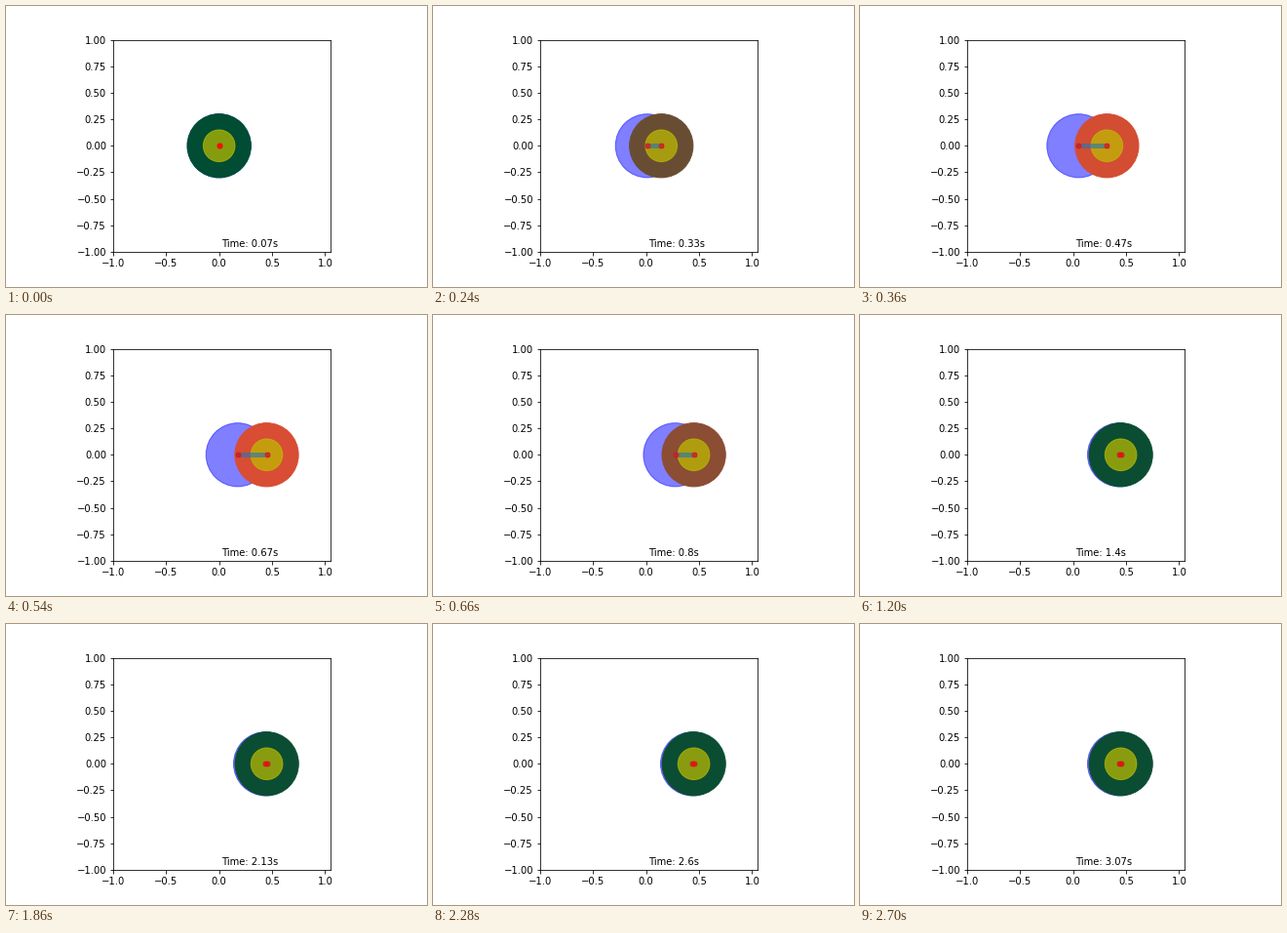
Animation of 432x288 px, one loop 2760 ms. Source, as a matplotlib script:

```python
import matplotlib.pyplot as plt
from matplotlib.animation import FuncAnimation
from matplotlib.patches import Circle

FRAMES = 46
INTERVAL = 60
FPS = 15

plt.rcParams["font.family"] = "DejaVu Sans"


def smooth_reach(t, start, duration, distance):
    """Minimum-jerk move from 0 to distance."""
    u = min(max((t - start) / duration, 0.0), 1.0)
    return distance * u**3 * (10 - 15 * u + 6 * u * u)


def lead_x(t):
    return smooth_reach(t, 0.085, 0.62, 0.45)


def follower_x(t):
    return smooth_reach(t, 0.176, 1.095, 0.436)


fig = plt.figure(figsize=(6, 4), dpi=72, facecolor="white")
fig.subplots_adjust(left=0.125, right=0.9, bottom=0.125, top=0.88)
ax = fig.add_subplot(aspect="equal", xlim=(-1, 1.05), ylim=(-1, 1))

follower = ax.add_patch(Circle((0, 0), 0.3, color="blue", alpha=0.5))
lead = ax.add_patch(Circle((0, 0), 0.3, color=(0, 0.3, 0.2)))
core = ax.add_patch(Circle((0, 0), 0.15, color="y", alpha=0.7))
link, = ax.plot([0, 0], [0, 0], "o-", color="C0", lw=5, alpha=0.6,
                markersize=5, mfc="red", mec="red")
label = ax.text(0.5, 0.0225, "", transform=ax.transAxes, fontsize=10)


def update(i):
    t = (i + 1) / FPS
    front, back = lead_x(t), follower_x(t)
    follower.center = (back, 0)
    lead.center = core.center = (front, 0)
    # The lead disc reddens as the link stretches.
    lead.set_color((min(3.1 * abs(front - back), 1), 0.3, 0.2))
    link.set_data([back, front], [0, 0])
    label.set_text(f"Time: {round(t, 2)}s")
    return follower, lead, core, link, label


anim = FuncAnimation(fig, update, frames=FRAMES, interval=INTERVAL,
                     repeat=True, repeat_delay=0)
plt.show()
```
